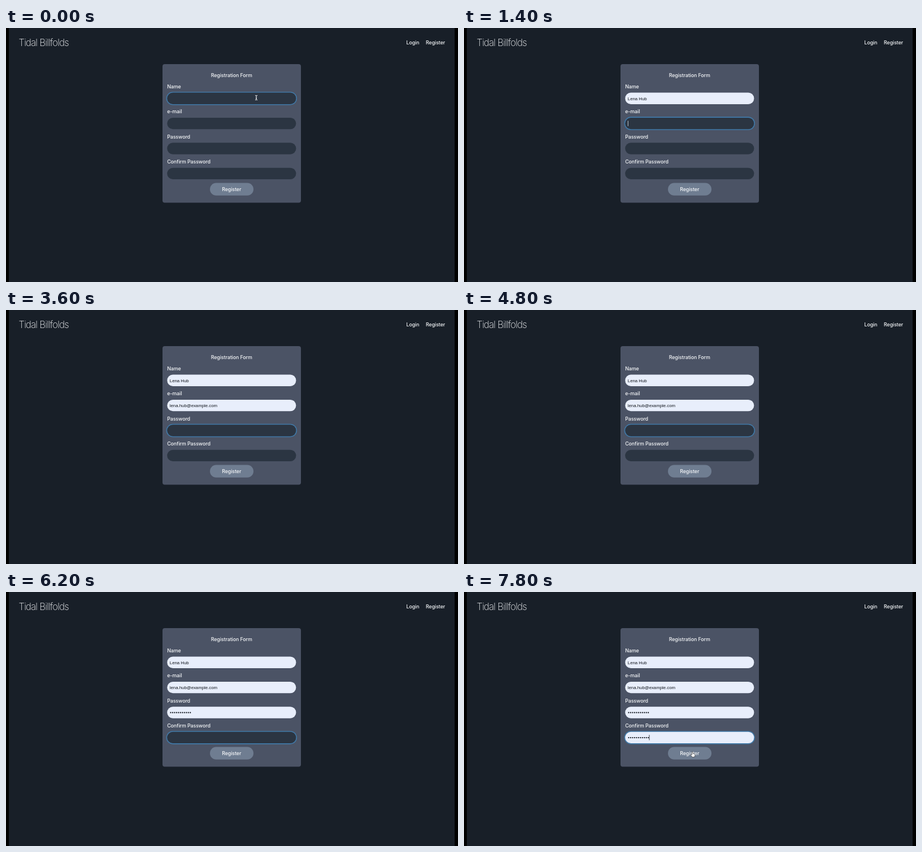
Write an HTML page that moves like this. It is 800 by 450 pixels and loops after 8000 ms.

```html
<!DOCTYPE html>
<html lang="en">
<head>
<meta charset="utf-8">
<title>Registration form</title>
<style>
  html, body { margin: 0; width: 100%; height: 100%; overflow: hidden; background: #000; }
  svg { display: block; width: 100vw; height: 100vh; }
  text { font: 500 8.9px Inter, sans-serif; letter-spacing: -.1px; fill: #f4f6f8; }
  .brand { font-weight: 200; font-size: 16.6px; letter-spacing: -.75px; }
  .value { font: 7.8px "Liberation Sans", Arial, sans-serif; letter-spacing: 0; }
  .middle { text-anchor: middle; }
  .dots { stroke-width: 2.3; stroke-linecap: round; stroke-dasharray: 0 3.47; }
</style>
</head>
<body>
<svg id="stage" viewBox="0 0 800 450">
  <rect x="5" width="789" height="450" fill="#181f28"/>
  <text class="brand" x="22.5" y="32">Tidal Billfolds</text>
  <text x="708.5" y="29">Login</text>
  <text x="743" y="29">Register</text>
  <rect x="277" y="64" width="245" height="245.5" rx="4" fill="#4b5365"/>
  <text class="middle" x="399.2" y="87">Registration Form</text>
  <g id="fields"></g>
  <rect x="361" y="274.5" width="77" height="22.3" rx="11.1" fill="#6f7d91"/>
  <text class="middle" x="399.2" y="289">Register</text>
  <path id="beam" d="M-2-4Q0-4 0-3Q0-4 2-4M0-3V3M-2 4Q0 4 0 3Q0 4 2 4M-1 1H1" fill="none" stroke="#fff"/>
  <path id="hand" d="M-1.5-4Q-.5-5 .3-4V-1.2L3.2-.5Q4.2 0 3.8 2L2.8 4.8H-1.2L-4 1Q-3.6-.4-1.5 1Z"
        fill="#fff" stroke="#222" stroke-width=".6"/>
</svg>
<script>
const LOOP = 8000, STEP = 200;
const NAME = "Lena Hub", EMAIL = "lena.hub@example.com", DOT_COUNT = 11;
const byId = id => document.getElementById(id);

function add(parent, tag, attributes) {
  const node = document.createElementNS("http://www.w3.org/2000/svg", tag);
  for (const key in attributes) node.setAttribute(key, attributes[key]);
  return parent.appendChild(node);
}

// filledAt: autofill time; focus: [start, end]; typed: [time, text] pairs
const fields = [
  { label: "Name", value: NAME, focus: [0, 1200], filledAt: 1000, typed: [[600, "L"], [800, "Le"]], caret: [[200, 1000]] },
  { label: "e-mail", value: EMAIL, focus: [1200, 3200], filledAt: 3000, typed: [[2600, "l"], [2800, "le"]],
    caret: [[1200, 1800], [2400, 3000]] },
  { label: "Password", focus: [3200, 5800], filledAt: 5200, caret: [[3200, 3600], [4000, 4600], [5000, 5800]] },
  { label: "Confirm Password", focus: [5800, LOOP], filledAt: 7000, caret: [[5800, 6200], [6400, LOOP]] }
];

fields.forEach((field, i) => {
  const top = 114.5 + i * 44.4, middle = top + 10.2, group = byId("fields");
  add(group, "text", { x: 285.2, y: top - 7.6 }).textContent = field.label;
  field.ring = add(group, "rect", { x: 284.6, y: top - .6, width: 229.4, height: 21.6, rx: 10.8,
    fill: "none", stroke: "#4079a8", "stroke-width": 1.9 });
  field.box = add(group, "rect", { x: 285.2, y: top, width: 228.2, height: 20.4, rx: 10.2 });
  field.text = add(group, "text", { class: "value", x: 289.8, y: middle + 2.8 });
  field.dots = add(group, "path", { class: "dots", stroke: "#10151c",
    d: `M291.5 ${middle + .2}h${(DOT_COUNT - 1) * 3.47 + .1}` });
  field.bar = add(group, "path", { d: `M0 ${middle - 4.7}v9.4`, "stroke-width": .8 });
});

const within = (t, [start, end]) => t >= start && t < end;
const show = (node, visible) => node.setAttribute("visibility", visible ? "visible" : "hidden");

function drawField(field, t) {
  const filled = t >= field.filledAt;
  const ink = filled ? "#10151c" : "#f0f3f6";
  const latest = (field.typed || []).filter(([time]) => t >= time).pop();
  field.text.textContent = filled ? field.value || "" : latest ? latest[1] : "";
  field.text.style.fill = ink;
  field.box.setAttribute("fill", filled ? "#e8eefb" : "#2b3542");
  show(field.ring, within(t, field.focus));
  show(field.dots, filled && !field.value);
  show(field.bar, within(t, field.focus) && field.caret.some(span => within(t, span)));
  const end = filled && !field.value ? 328 : 290.3 + field.text.getComputedTextLength();
  field.bar.setAttribute("transform", `translate(${end})`);
  field.bar.setAttribute("stroke", ink);
}

function drawPointer(t) {
  const p = Math.max(0, (t - 7400) / 400);
  const x = t < 7400 ? 443 : 484 - 79 * p;
  const y = t < 7400 ? 123.5 : 222 + 65.5 * p;
  const overButton = t >= 7800;
  show(byId("beam"), t < 600 || (t >= 7400 && !overButton));
  show(byId("hand"), overButton);
  for (const id of ["beam", "hand"]) byId(id).setAttribute("transform", `translate(${x} ${y})`);
}

function frame() {
  const t = Math.floor(performance.now() % LOOP / STEP) * STEP;
  fields.forEach(field => drawField(field, t));
  drawPointer(t);
  requestAnimationFrame(frame);
}
frame();
</script>
</body>
</html>
```
